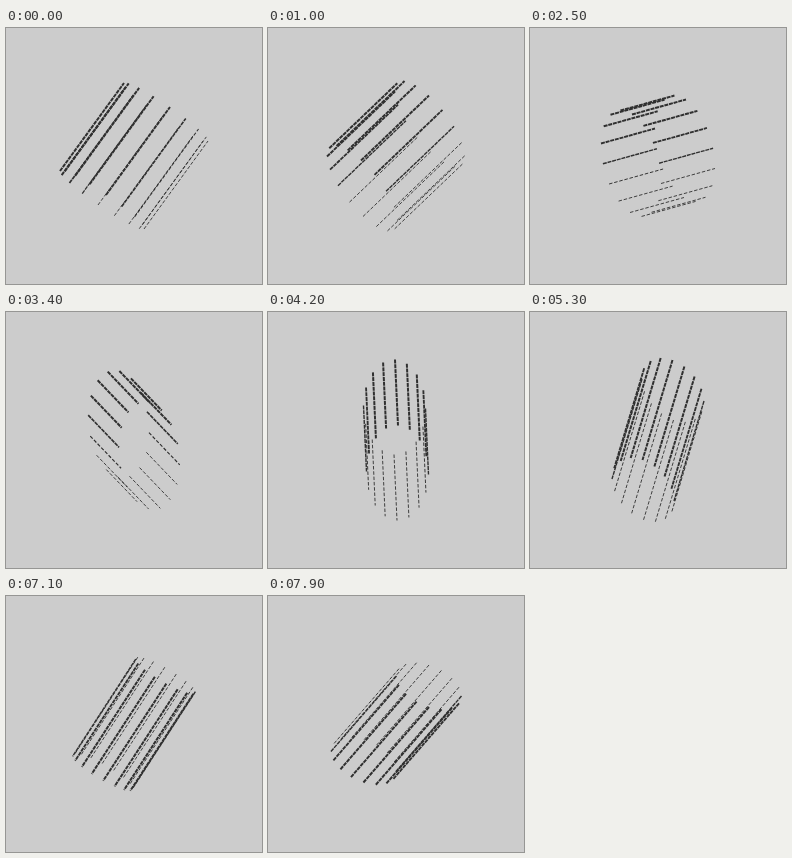
An HTML page with a canvas for the animation above (8000 ms loop, 256x256 px).

```html
<!DOCTYPE html>
<html lang="en">
<head>
<meta charset="utf-8">
<title>Tumbling cage of rods</title>
<style>
  html, body { margin: 0; width: 100%; height: 100%; overflow: hidden; background: #ccc; }
  canvas { display: block; width: 256px; height: 256px; }
</style>
</head>
<body>
<canvas id="stage" width="256" height="256"></canvas>
<script>
const ctx = document.getElementById('stage').getContext('2d');
const LOOP = 8000, SLOT = 100, RODS = 16, CENTER = 128;

// Projected basis: step, ring axis a (x, y), ring axis b (x, y), rod vector (x, y)
const poses = [
  [0, 4, -5, 42, 29, 64, -88],
  [10, -1, -28, 35, 32, 68, -65],
  [23, 1, -49, 30, 20, 54, -15],
  [30, 0.8, -53, 30.3, 10, 34, 27],
  [39, 0.5, -47.5, 31, 1.5, 3, 66],
  [49, -0.5, -30, 31, 11, -30, 100],
  [59, 1, -4, 28.5, 19, -57, 109],
  [72, 0, 21, 32.5, 10, -66, 76]
];

// Parabolic slope at an inner pose, one-sided at the ends
function slope(i, c) {
  const rise = j => (poses[j + 1][c] - poses[j][c]) / (poses[j + 1][0] - poses[j][0]);
  if (i === 0) return rise(0);
  if (i === poses.length - 1) return rise(i - 1);
  const before = poses[i][0] - poses[i - 1][0];
  const after = poses[i + 1][0] - poses[i][0];
  return (rise(i - 1) * after + rise(i) * before) / (before + after);
}

function poseAt(step) {
  let i = 0;
  while (i < poses.length - 2 && poses[i + 1][0] <= step) i++;
  const p = poses[i], q = poses[i + 1];
  const h = q[0] - p[0], u = (step - p[0]) / h, v = 1 - u;
  return [1, 2, 3, 4, 5, 6].map(c =>
    v * v * (1 + 2 * u) * p[c] + u * u * (1 + 2 * v) * q[c] +
    u * v * h * (v * slope(i, c) - u * slope(i + 1, c)));
}

function draw(step) {
  const [ax, ay, bx, by, dx, dy] = poseAt(step);
  const bold = -Math.PI / 3 * Math.max(0, 1 - step / 39);
  ctx.fillStyle = '#ccc';
  ctx.fillRect(0, 0, 256, 256);
  ctx.strokeStyle = '#303030';
  for (let i = 0; i < RODS; i++) {
    const angle = i * 2 * Math.PI / RODS;
    const cos = Math.cos(angle), sin = Math.sin(angle);
    const x = CENTER + ax * cos + bx * sin;
    const y = CENTER + ay * cos + by * sin;
    const weight = Math.min(2, Math.max(0.9, 1.4 + 1.2 * Math.cos(angle - bold)));
    ctx.lineWidth = weight;
    ctx.setLineDash(weight > 1.2 ? [4, 0.8] : [3.5, 1.8]);
    ctx.beginPath();
    ctx.moveTo(x - dx / 2, y - dy / 2);
    ctx.lineTo(x + dx / 2, y + dy / 2);
    ctx.stroke();
  }
}

const start = performance.now();
function tick() {
  const slot = Math.floor((performance.now() - start) % LOOP / SLOT);
  // Every eleventh slot holds the previous pose
  draw(slot - Math.floor(slot / 11));
  requestAnimationFrame(tick);
}
tick();
</script>
</body>
</html>
```
